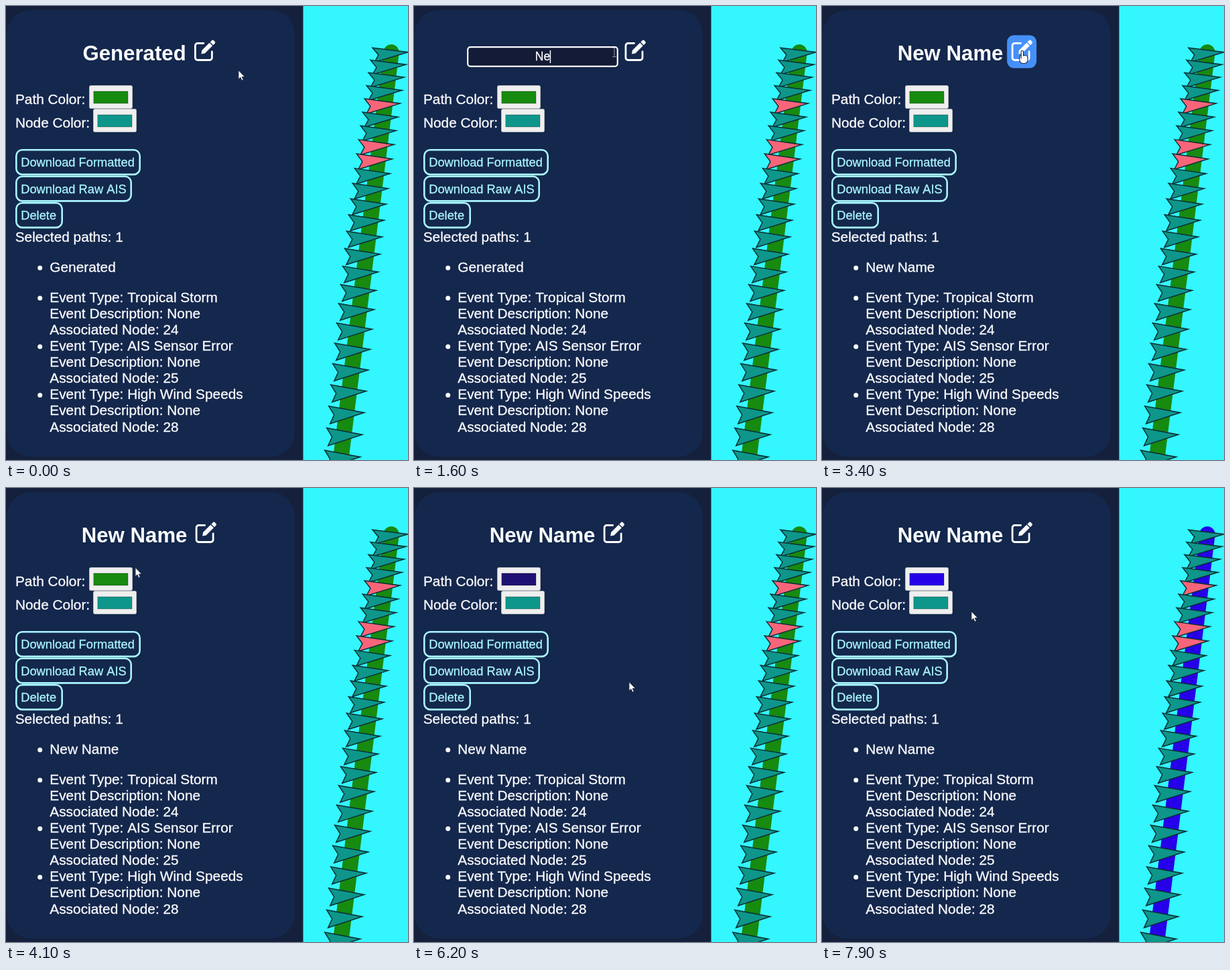
Write an HTML page with a canvas that moves like this. It is 600x676 px and loops after 8000 ms.

```html
<!DOCTYPE html>
<html lang="en">
<head>
<meta charset="utf-8">
<title>Path editor</title>
<style>
html, body { margin: 0; width: 100%; height: 100%; overflow: hidden; background: #14203c; }
canvas { display: block; }
</style>
</head>
<body>
<canvas id="stage" width="600" height="676"></canvas>
<script>
const ctx = document.getElementById('stage').getContext('2d');
const LOOP = 8000, STEP = 100;
const SANS = '"Liberation Sans", Arial, sans-serif';
const WHITE = '#fbfcff', AQUA = '#a9f6ff', DARK = '#14203c', PANEL = '#14274c';
const TEAL = '#0e968a', PINK = '#f8657a';
const GREEN = [23, 138, 16], NIGHT = [31, 17, 115], BLUE = [38, 0, 232];

const BODY = 20.85, LINE = 24.07, CENTER = 191.6;
const EDIT_START = 600, EDIT_END = 2900, CLOSE_PICKER = 7500;
const TYPE_START = 1330, TYPE_GAP = 170, BLINK = 530;
const NEW_NAME = 'New Name';
const MARKERS = 25;

// Pointer moves: from, to, x, y at the end
const moves = [
  [0, 400, 299, 69],       // edit icon
  [3700, 4300, 156, 136],  // colour well
  [4500, 5000, 309, 332],  // hue slider
  [5800, 6100, 321, 289],  // shade
  [6300, 6900, 346, 172],  // brighter shade
  [7200, 7700, 223, 184]
];

function ease(t, from, to) {
  const u = Math.min(1, Math.max(0, (t - from) / (to - from)));
  return u * u * (3 - 2 * u);
}

function mix(a, b, u) {
  return a.map((v, i) => v + (b[i] - v) * u);
}

function pointerAt(t) {
  return moves.reduce((p, [from, to, x, y]) => mix(p, [x, y], ease(t, from, to)), [347, 96]);
}

function rgb(c) {
  return `rgb(${c.map(Math.round).join(',')})`;
}

function wellColor(t) {
  return rgb(mix(mix(GREEN, NIGHT, ease(t, 5200, 6000)), BLUE, ease(t, 6300, 6900)));
}

function text(str, x, y, size, color = WHITE, weight = '') {
  ctx.font = `${weight} ${size}px ${SANS}`;
  ctx.fillStyle = ctx.strokeStyle = color;
  ctx.lineWidth = 0.3;
  ctx.fillText(str, x, y);
  if (!weight) ctx.strokeText(str, x, y);
}

function box(x, y, w, h, r, fill, stroke, line = 1) {
  ctx.beginPath();
  ctx.roundRect(x, y, w, h, r);
  if (fill) { ctx.fillStyle = fill; ctx.fill(); }
  if (stroke) { ctx.strokeStyle = stroke; ctx.lineWidth = line; ctx.stroke(); }
}

function poly(points, fill, stroke, line) {
  ctx.beginPath();
  points.forEach(p => ctx.lineTo(p[0], p[1]));
  ctx.closePath();
  ctx.fillStyle = fill;
  ctx.fill();
  if (!stroke) return;
  ctx.strokeStyle = stroke;
  ctx.lineWidth = line;
  ctx.stroke();
}

// Ship markers trail south-west, each a little further apart and larger
function marker(i) {
  const k = i / (MARKERS - 1);
  const x = 547 - 2.97 * i;
  const y = 62.2 + 16.6 * i + 0.348 * i * i + 5 * (1 - k * 0.85) * Math.sin(Math.PI * i / 11);
  const h = 21.5 + 5 * k;
  const alert = i === 4 || i === 7 || i === 8;
  poly([[x, y], [x + 53, y + 6.5 + 3.5 * k], [x + 3 - k, y + h], [x + 9 - k, y + h / 2]],
    alert ? PINK : TEAL, '#0b2f35', 1.5);
}

function drawMap(pathColor) {
  ctx.fillStyle = '#33f6ff';
  ctx.fillRect(443.5, 0, 157, 676);
  ctx.strokeStyle = pathColor;
  ctx.lineWidth = 23.5;
  ctx.lineCap = 'round';
  ctx.beginPath();
  ctx.moveTo(575, 69);
  ctx.lineTo(496.5, 700);
  ctx.stroke();
  for (let i = 0; i < MARKERS; i++) marker(i);
}

function colorWell(x, y, color) {
  box(x + 0.5, y + 0.5, 64, 34, 2, '#efefef', '#b4b7bd');
  box(x + 7, y + 9, 51, 18, 0, color, 'rgba(0,0,0,0.3)');
}

function button(label, y, w) {
  box(15.3, y + 1.3, w - 2.6, 36.6, 9, null, AQUA, 2.6);
  text(label, 22.2, y + 26, 18.3, AQUA);
}

function editIcon(x, y) {
  ctx.save();
  ctx.translate(x, y);
  ctx.strokeStyle = WHITE;
  ctx.lineWidth = 2.8;
  ctx.lineCap = ctx.lineJoin = 'round';
  ctx.beginPath();
  ctx.moveTo(14, 5.5);
  ctx.arcTo(1.5, 5.5, 1.5, 18, 3.5);
  ctx.arcTo(1.5, 30.5, 14, 30.5, 3.5);
  ctx.arcTo(26.5, 30.5, 26.5, 18, 3.5);
  ctx.lineTo(26.5, 18);
  ctx.stroke();
  // pencil, lying along its own x axis
  ctx.translate(10.5, 21.5);
  ctx.rotate(-Math.PI / 4);
  poly([[0, 0], [4.5, -3.2], [20.5, -3.2], [20.5, 3.2], [4.5, 3.2]], WHITE);
  box(22, -3.2, 5.5, 6.4, [0, 2, 2, 0], WHITE);
  ctx.restore();
}

function drawInput(t) {
  box(80.2, 61.2, 223.6, 28.6, 4, '#141b36', WHITE, 2.2);
  const count = Math.floor((t - TYPE_START) / TYPE_GAP) + 1;
  const typed = NEW_NAME.slice(0, Math.max(0, count));
  ctx.font = `17.5px ${SANS}`;
  const w = ctx.measureText(typed).width;
  text(typed, 192 - w / 2, 81, 17.5);
  const lastKey = typed ? TYPE_START + (typed.length - 1) * TYPE_GAP : EDIT_START;
  if ((t - lastKey) % (2 * BLINK) < BLINK) ctx.fillRect(191.5 + w / 2, 66, 1.5, 19);
  editIcon(314.5, 50);
}

function drawTitle(name, hover) {
  ctx.font = `bold 31.2px ${SANS}`;
  const half = ctx.measureText(name).width / 2;
  const iconX = CENTER + half + 12.2;
  text(name, CENTER - half, 81, 31.2, WHITE, 'bold');
  if (hover) box(iconX - 6.5, 43.5, 44, 49, 10, '#4590f8');
  editIcon(iconX, 50);
}

function bullet(str, y) {
  text(str, 65.3, y, BODY);
  ctx.beginPath();
  ctx.arc(50.7, y - 6, 3.5, 0, Math.PI * 2);
  ctx.fill();
}

function drawPanel(t, editing, hover) {
  ctx.fillStyle = DARK;
  ctx.fillRect(0, 0, 444, 676);
  box(1, 6, 430, 665, 36, PANEL);

  const name = t < EDIT_END ? 'Generated' : NEW_NAME;
  if (editing) drawInput(t);
  else drawTitle(name, hover);

  text('Path Color:', 13.9, 146, BODY);
  text('Node Color:', 13.9, 181, BODY);
  colorWell(124, 118, wellColor(t));
  colorWell(130, 153, TEAL);
  button('Download Formatted', 213, 187);
  button('Download Raw AIS', 252.5, 174);
  button('Delete', 292, 71);

  text('Selected paths: 1', 13.7, 351, BODY);
  bullet(name, 396);
  const events = [['Tropical Storm', 24], ['AIS Sensor Error', 25], ['High Wind Speeds', 28]];
  events.forEach(([type, node], i) => {
    const y = 441 + i * 3 * LINE;
    bullet('Event Type: ' + type, y);
    text('Event Description: None', 65.3, y + LINE, BODY);
    text('Associated Node: ' + node, 65.3, y + 2 * LINE, BODY);
  });
}

function arrowCursor() {
  poly([[0, 0], [0, 13], [3, 10.3], [5, 15], [7.2, 14], [5.2, 9.6], [9, 9.3]], '#fff', '#20263c', 0.8);
}

function handCursor() {
  box(-4, 4.5, 12, 12, [2, 4, 5, 5], '#fff', '#1b2545', 1.1);
  box(-1.8, -2.5, 3.4, 12, 1.7, '#fff', '#1b2545', 1.1);
  box(-1.2, 5.5, 8, 9, 3, '#fff');
}

function beamCursor() {
  ctx.fillStyle = '#8a91a5';
  ctx.fillRect(-0.5, -6.5, 1, 13);
  ctx.fillRect(-3, -7, 6, 1);
  ctx.fillRect(-3, 6, 6, 1);
}

function draw(t) {
  const [x, y] = pointerAt(t);
  const editing = t >= EDIT_START && t < EDIT_END;
  const hover = !editing && Math.abs(x - 298) < 22 && Math.abs(y - 68) < 25;
  drawPanel(t, editing, hover);
  drawMap(rgb(t < CLOSE_PICKER ? GREEN : BLUE));
  ctx.save();
  ctx.translate(x, y);
  if (editing) beamCursor();
  else if (hover) handCursor();
  else arrowCursor();
  ctx.restore();
}

const start = performance.now();
function tick() {
  const t = (performance.now() - start) % LOOP;
  draw(Math.floor(t / STEP) * STEP);
  requestAnimationFrame(tick);
}
tick();
</script>
</body>
</html>
```
